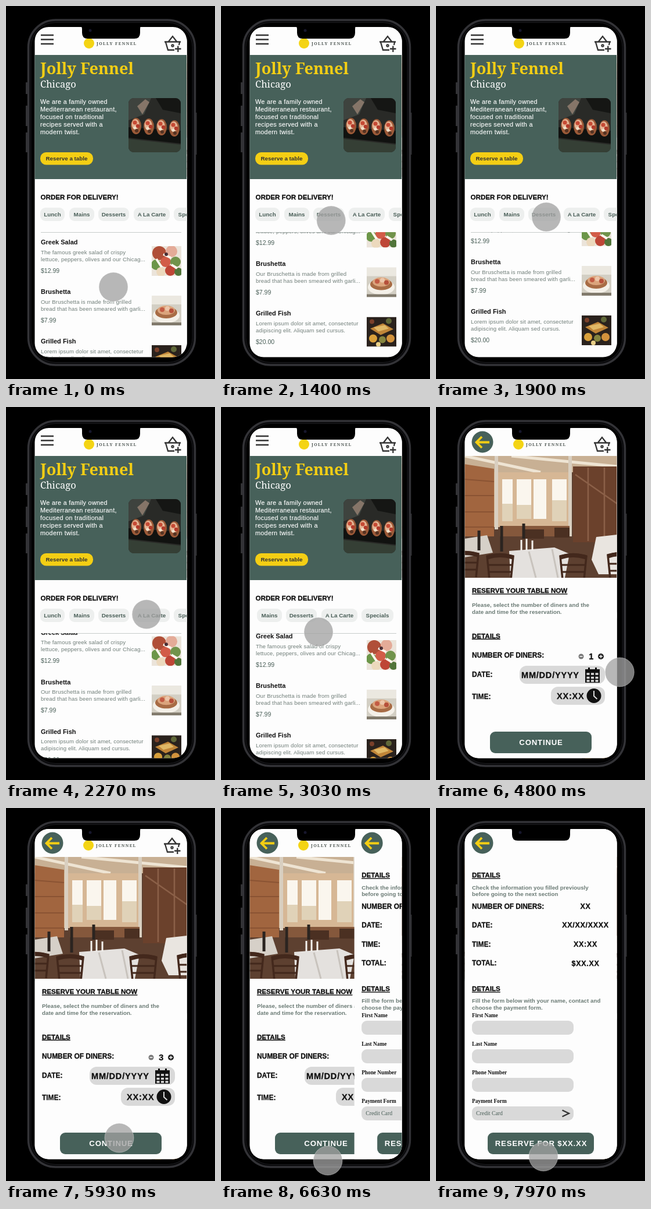
An HTML page for the animation above (8 s loop, 360 by 640 pixels).

```html
<!DOCTYPE html>
<html lang="en">
<head>
<meta charset="utf-8">
<title>Restaurant app walkthrough</title>
<style>
  html, body { margin: 0; width: 100%; height: 100%; overflow: hidden; background: #000; }
  svg { display: block; width: 100%; height: 100%; }
  text { font-family: "Liberation Sans", Arial, sans-serif; fill: #495e57; white-space: pre; }
  .h, .label, .value, .input { font-weight: bold; fill: #111; stroke: #111; stroke-width: .3px; }
  .h { font-size: 11.6px; }
  .u { text-decoration: underline; }
  .label { font-size: 11.9px; }
  .value { font-size: 12.5px; letter-spacing: .7px; text-anchor: middle; }
  .note { font-weight: bold; font-size: 9.7px; letter-spacing: .05px; fill: #6a7a74; }
  .intro { font-size: 10.8px; letter-spacing: .3px; fill: #fff; stroke: #fff; stroke-width: .15px; }
  .brand { font: bold 27px "Noto Serif", serif; fill: #f4ce14; }
  .city { font: 16.5px "Noto Serif", serif; fill: #fff; }
  .logo { font: bold 7px "Noto Serif", serif; letter-spacing: 1.4px; fill: #4b5450; }
  .chip { font-weight: bold; font-size: 9.8px; text-anchor: middle; }
  .dish { font-weight: bold; font-size: 11px; fill: #111; }
  .desc { font-size: 9.6px; letter-spacing: .15px; fill: #6f7d78; }
  .price { font-size: 10.5px; }
  .input { font-size: 14.5px; letter-spacing: .8px; }
  .button { font-weight: bold; font-size: 13.2px; letter-spacing: .8px; fill: #fff; text-anchor: middle; }
  .form { font: bold 9.3px "Liberation Serif", serif; fill: #111; }
  .option { font: 9.8px "Liberation Serif", serif; }
  .line { fill: none; stroke: #333; stroke-width: 2.3; }
  .field { fill: #d9d9d9; }
  .paper { fill: #fdfdfd; }
  .green { fill: #47615a; }
</style>
</head>
<body>
<svg viewBox="0 0 360 640" xmlns="http://www.w3.org/2000/svg">
  <defs>
    <clipPath id="screen"><rect x="49.500" y="36" width="262" height="566.500" rx="24"/></clipPath>
    <clipPath id="listArea"><rect x="49" y="388" width="263" height="215"/></clipPath>
    <clipPath id="chipArea"><rect x="58" y="340" width="254" height="35"/></clipPath>
    <clipPath id="heroArea"><rect x="211" y="158" width="90" height="93" rx="9"/></clipPath>
    <clipPath id="thumb"><rect width="51" height="51"/></clipPath>
    <clipPath id="photoArea"><rect x="49.500" y="84" width="262.500" height="209"/></clipPath>

    <g id="brandMark">
      <circle cx="143" cy="64" r="9" fill="#f4d414"/>
      <text class="logo" x="156" y="66.5">JOLLY FENNEL</text>
      <g class="line">
        <path d="M280 61L287 52L294 61M273 61.5H301M275 62L279 75.5H290M299 62L298 67"/>
        <path d="M291 73.5H301.500M296.300 68.500V79"/>
        <circle cx="287" cy="68" r="1.700" stroke-width="2"/>
      </g>
    </g>
    <g id="back">
      <circle class="green" cx="80" cy="60" r="18.500"/>
      <path d="M92 60.500H70M79 51L69.500 60.500L79 70" fill="none" stroke="#f4ce14" stroke-width="3.800"/>
    </g>
    <g id="toast">
      <ellipse rx="9" ry="14" fill="#9c5a38"/>
      <ellipse cx="-1" cy="-3" rx="6.500" ry="9" fill="#e5b494"/>
      <circle cx="-2" cy="-6" r="3.600" fill="#c64a34"/>
      <circle cx="3" cy="0" r="3.200" fill="#b33a2b"/>
      <circle cx="-2" cy="3" r="2.600" fill="#f0e2cb"/>
      <circle cx="1" cy="8" r="3" fill="#553323"/>
    </g>
    <g id="chair" fill="none" stroke="#43281c">
      <path d="M4 44L0 4Q22 -3 45 4L41 44" stroke-width="3.500"/>
      <path d="M1 6Q22 -1 44 6" stroke-width="7"/>
      <path d="M3 19H42M4 31H41" stroke-width="3"/>
    </g>

    <g id="salad">
      <rect width="51" height="51" fill="#ebe4da"/>
      <circle cx="13" cy="12" r="12" fill="#b04f38"/><circle cx="34" cy="9" r="10" fill="#e4ab98"/>
      <circle cx="8" cy="32" r="9" fill="#6c9648"/><circle cx="24" cy="27" r="9" fill="#d25c48"/>
      <circle cx="41" cy="27" r="9" fill="#71934b"/><circle cx="16" cy="44" r="8" fill="#ecd9bd"/>
      <circle cx="32" cy="42" r="9" fill="#be4637"/><circle cx="46" cy="44" r="7" fill="#51753a"/>
      <path d="M20 14L33 20M8 22L17 36M34 32L44 38" stroke="#fff7ee" stroke-width="4"/>
      <circle cx="25" cy="14" r="3" fill="#4a3037"/>
    </g>
    <g id="bread">
      <rect width="51" height="51" fill="#d3cfc4"/>
      <rect width="51" height="15" fill="#ebe8e0"/>
      <ellipse cx="25" cy="34" rx="23" ry="13" fill="#f4f0e8"/>
      <ellipse cx="25" cy="29" rx="19" ry="10" fill="#a86c45"/>
      <ellipse cx="25" cy="25" rx="15" ry="8" fill="#dba47c"/>
      <circle cx="18" cy="24" r="4" fill="#c35b44"/><circle cx="27" cy="22" r="4" fill="#ecc6aa"/>
      <circle cx="34" cy="26" r="4" fill="#b6503b"/>
      <rect y="46" width="51" height="5" fill="#817a6c"/>
    </g>
    <g id="fish">
      <rect width="51" height="51" fill="#2a221d"/>
      <path d="M6 20L28 11L46 21L24 31Z" fill="#c08538"/>
      <path d="M12 18L31 14L38 20L20 25Z" fill="#e0b866"/>
      <circle cx="11" cy="37" r="7" fill="#d9a03a"/><circle cx="27" cy="39" r="6" fill="#85853f"/>
      <circle cx="41" cy="37" r="7" fill="#d2923c"/><circle cx="38" cy="7" r="5" fill="#606838"/>
      <circle cx="9" cy="8" r="4" fill="#7a402a"/><circle cx="20" cy="47" r="4" fill="#e9d088"/>
    </g>
  </defs>

  <rect width="360" height="640"/>
  <path d="M35.500 131V151M35.500 171V206M35.500 217V251M327 183V255" stroke="#333336" stroke-width="3"/>
  <rect x="38.500" y="24" width="287" height="592" rx="47" fill="#0a0a0c" stroke="#333337" stroke-width="3.500"/>
  <rect x="43" y="28.500" width="278" height="583" rx="42" fill="#000" stroke="#1b1b1e"/>

  <g clip-path="url(#screen)">
    <g id="home">
      <rect class="paper" x="49" y="36" width="263" height="567"/>
      <path class="line" d="M60 50H82M60 57.500H82M60 65H82"/>
      <use href="#brandMark"/>
      <rect class="green" x="49" y="84" width="263" height="213"/>
      <text class="brand" x="59" y="117">Jolly Fennel</text>
      <text class="city" x="59" y="139.500">Chicago</text>
      <g id="intro"></g>
      <rect x="59" y="251" width="91" height="21.500" rx="10" fill="#f4ce14"/>
      <text class="chip" x="104.500" y="265.300" style="fill:#333">Reserve a table</text>
      <g clip-path="url(#heroArea)">
        <rect x="211" y="158" width="90" height="93" fill="#292a27"/>
        <path d="M211 158H250L238 186L211 196Z" fill="#3e433e"/>
        <path d="M226 172L240 160L247 165L235 186Z" fill="#857568"/>
        <path d="M258 158H301V184L270 178Z" fill="#151614"/>
        <path d="M211 208L301 214V236L211 226Z" fill="#111210"/>
        <path d="M211 228L301 238V251H211Z" fill="#353f35"/>
        <use href="#toast" x="224" y="206"/><use href="#toast" x="246" y="207"/>
        <use href="#toast" x="268" y="208"/><use href="#toast" x="290" y="210"/>
      </g>
      <text class="h" x="59.500" y="332.300">ORDER FOR DELIVERY!</text>
      <g clip-path="url(#chipArea)"><g id="chips"></g></g>
      <path d="M60 388.500H302" stroke="#c8cccb"/>
      <g clip-path="url(#listArea)"><g id="list"></g></g>
    </g>

    <g id="booking">
      <rect class="paper" x="49.500" y="36" width="263" height="567"/>
      <use href="#back"/><use href="#brandMark" x="-1"/>
      <g clip-path="url(#photoArea)">
        <rect x="49" y="84" width="263" height="209" fill="#5d4030"/>
        <path d="M49 84H312V112H49Z" fill="#c8b094"/>
        <path d="M49 84L180 112M130 84L312 102" stroke="#eee4d3" stroke-width="5"/>
        <path d="M49 98L100 106V222H49Z" fill="#a1653f"/>
        <path d="M49 124L100 128M49 152H100M49 180H100M49 206H100" stroke="#8a5333" stroke-width="2"/>
        <rect x="100" y="112" width="134" height="94" fill="#d6b795"/>
        <path d="M114 124H132V196H114ZM139 124H164V192H139ZM168 124H190V192H168ZM200 124H225V196H200Z" fill="#faf6ee"/>
        <path d="M114 166H132V196H114ZM139 168H164V192H139ZM200 160H225V196H200Z" fill="#e0d2b8"/>
        <path d="M104 84V210M231 84V222" stroke="#d9cfc0" stroke-width="6"/>
        <path d="M236 102H312V232H236Z" fill="#6b412c"/>
        <path d="M240 116L312 166M262 104V230M290 104V230" stroke="#8b6048" stroke-width="2.500"/>
        <path d="M110 204H230V222H110Z" fill="#85583c"/>
        <path d="M49 226L88 220L98 250L49 258Z" fill="#d6d0c8"/>
        <path d="M150 210H186V226H150ZM204 207H230V224H204Z" fill="#4b3022"/>
        <path d="M276 223L312 219V287H280L268 262Z" fill="#e9e5e0"/>
        <path d="M126 247L204 241L230 252L222 293H128Z" fill="#e4e1de"/>
        <path d="M160 248L172 293M200 244L210 293" stroke="#c8c3bd" stroke-width="3"/>
        <path d="M113 204V248M74 212V246M151 200V226" stroke="#2b2420" stroke-width="5"/>
        <path d="M147 228V246M156 226V246M166 229V246" stroke="#f4f2ee" stroke-width="3"/>
        <use href="#chair" x="88" y="252"/><use href="#chair" x="214" y="252"/>
        <use href="#chair" x="28" y="248"/><use href="#chair" x="296" y="250"/>
      </g>
      <text class="h u" x="62" y="319.300">RESERVE YOUR TABLE NOW</text>
      <text class="note" x="62" y="343.300">Please, select the number of diners and the</text>
      <text class="note" x="62" y="355">date and time for the reservation.</text>
      <text class="h u" x="62" y="396.800">DETAILS</text>
      <text class="label" x="62" y="429.800">NUMBER OF DINERS:</text>
      <text class="label" x="62" y="462.800">DATE:</text>
      <text class="label" x="62" y="501.300">TIME:</text>
      <circle cx="250" cy="428" r="4.500" fill="#777"/>
      <circle cx="284" cy="428" r="5" fill="#222"/>
      <path d="M247.500 428H252.500M281 428H287M284 425V431" stroke="#fdfdfd" stroke-width="1.300"/>
      <text id="count" class="input" x="267.800" y="433.300" text-anchor="middle"></text>
      <rect class="field" x="144" y="444" width="147" height="31" rx="12"/>
      <text class="input" x="147" y="464.700">MM/DD/YYYY</text>
      <path d="M257 450H282V473H257ZM262 447H265V451H262ZM274 447H277V451H274Z" fill="#111"/>
      <path d="M259.500 458H279.500M259.500 464.500H279.500M259.500 470H279.500" stroke="#d9d9d9" stroke-width="3.500" stroke-dasharray="5 2.500"/>
      <rect class="field" x="198" y="480" width="93" height="31" rx="12"/>
      <text class="input" x="208" y="500.500">XX:XX</text>
      <circle cx="272" cy="495.500" r="12.500" fill="#111"/>
      <path d="M272 487V496L277.500 501" fill="none" stroke="#d9d9d9" stroke-width="2"/>
      <rect class="green" x="93" y="557" width="175" height="37" rx="9"/>
      <text class="button" x="181" y="580.300">CONTINUE</text>
    </g>

    <g id="checkout">
      <rect class="paper" x="49.500" y="36" width="263" height="567"/>
      <use href="#back"/>
      <text class="h u" x="62" y="119.300">DETAILS</text>
      <text class="note" x="62" y="139.500">Check the information you filled previously</text>
      <text class="note" x="62" y="151">before going to the next section</text>
      <g id="summary"></g>
      <text class="h u" x="62" y="314.300">DETAILS</text>
      <text class="note" x="62" y="334.300">Fill the form below with your name, contact and</text>
      <text class="note" x="62" y="346">choose the payment form.</text>
      <g id="fields"></g>
      <text class="option" x="69" y="527.300">Credit Card</text>
      <path class="line" d="M217.500 518.500L229 524L217.500 529.500"/>
      <rect class="green" x="89" y="557" width="183" height="37" rx="9"/>
      <text class="button" x="181" y="580.300">RESERVE FOR $XX.XX</text>
    </g>
  </g>

  <path d="M129 35H232Q231 36 231 40V46Q231 56 221 56H141Q131 56 131 46V40Q131 36 129 35Z"/>
  <circle cx="145" cy="42" r="2.500" fill="#17172c"/>
  <circle id="touch" r="25" fill="#a2a2a2" fill-opacity=".76" stroke="#fff" stroke-opacity=".35"/>
</svg>

<script>
const $ = id => document.getElementById(id);
const text = (cls, x, y, s) => `<text class="${cls}" x="${x}" y="${y}">${s}</text>`;
const fill = (id, items, draw) => $(id).innerHTML = items.map(draw).join('');

fill('intro', ['We are a family owned', 'Mediterranean restaurant,', 'focused on traditional',
  'recipes served with a', 'modern twist.'], (s, i) => text('intro', 59, 167.5 + 13 * i, s));

fill('chips', [['Lunch', 59, 42], ['Mains', 109, 43], ['Desserts', 159, 53], ['A La Carte', 220, 62], ['Specials', 289, 55]],
  ([s, x, w]) => `<rect x="${x}" y="346" width="${w}" height="23" rx="9" fill="#edefee"/>` +
    text('chip', x + w / 2, 361, s));

fill('list', [
  ['Greek Salad', 'The famous greek salad of crispy', 'lettuce, peppers, olives and our Chicag...', '$12.99', 'salad'],
  ['Brushetta', 'Our Bruschetta is made from grilled', 'bread that has been smeared with garli...', '$7.99', 'bread'],
  ['Grilled Fish', 'Lorem ipsum dolor sit amet, consectetur', 'adipiscing elit. Aliquam sed cursus.', '$20.00', 'fish'],
], ([name, a, b, price, pic], i) => `<g transform="translate(0 ${85 * i})">` +
  text('dish', 60, 409.3, name) + text('desc', 60, 426, a) + text('desc', 60, 438, b) + text('price', 60, 458, price) +
  `<g transform="translate(251 412)" clip-path="url(#thumb)"><use href="#${pic}"/></g></g>`);

fill('summary', [['NUMBER OF DINERS:', 'XX'], ['DATE:', 'XX/XX/XXXX'], ['TIME:', 'XX:XX'], ['TOTAL:', '$XX.XX']],
  ([s, v], i) => text('label', 62, 172.5 + 32.6 * i, s) + text('value', 257.5, 172.7 + 32.6 * i, v));

fill('fields', ['First Name', 'Last Name', 'Phone Number', 'Payment Form'], (s, i) =>
  text('form', 62, 359 + 49 * i, s) +
  `<rect class="field" x="62" y="${365 + 49 * i}" width="175" height="24" rx="9"/>`);

// Keys are [time, ...values], eased between neighbours.
const touchPath = [[0, 185, 482], [450, 185, 482], [1550, 190, 362], [2050, 190, 362], [2480, 290, 350],
  [3030, 168, 386], [3230, 166, 384], [3600, 130, 282], [3770, 130, 282], [4000, 151, 290], [4580, 312, 456],
  [5000, 320, 454], [5430, 320, 454], [5930, 195, 566], [6230, 184, 604], [6630, 184, 605], [7100, 184, 607],
  [7870, 185, 598]];
const listScroll = [[450, 0], [1550, 51], [2050, 51], [2350, 12]];
const chipScroll = [[2500, 0], [3030, 47], [3250, 47], [3560, 32]];

function at(keys, t) {
  const i = keys.findIndex(k => k[0] > t);
  if (i < 0) return keys[keys.length - 1].slice(1);
  if (i === 0) return keys[0].slice(1);
  const [a, b] = [keys[i - 1], keys[i]], k = (t - a[0]) / (b[0] - a[0]), e = k * k * (3 - 2 * k);
  return a.slice(1).map((v, j) => v + (b[j + 1] - v) * e);
}

const move = (id, x, y) => $(id).setAttribute('transform', `translate(${x} ${y})`);

function slideIn(id, t, start) {
  const k = Math.min(1, Math.max(0, (t - start) / 300));
  move(id, 261.5 * (1 - k) ** 2, 0);
}

function frame(now) {
  const t = now % 8000;
  move('list', 0, -at(listScroll, t)[0]);
  move('chips', -at(chipScroll, t)[0], 0);
  slideIn('booking', t, 3850);
  slideIn('checkout', t, 6580);
  $('count').textContent = 1 + (t > 4850) + (t > 5150);
  move('touch', ...at(touchPath, t));
  requestAnimationFrame(frame);
}
requestAnimationFrame(frame);
</script>
</body>
</html>
```
